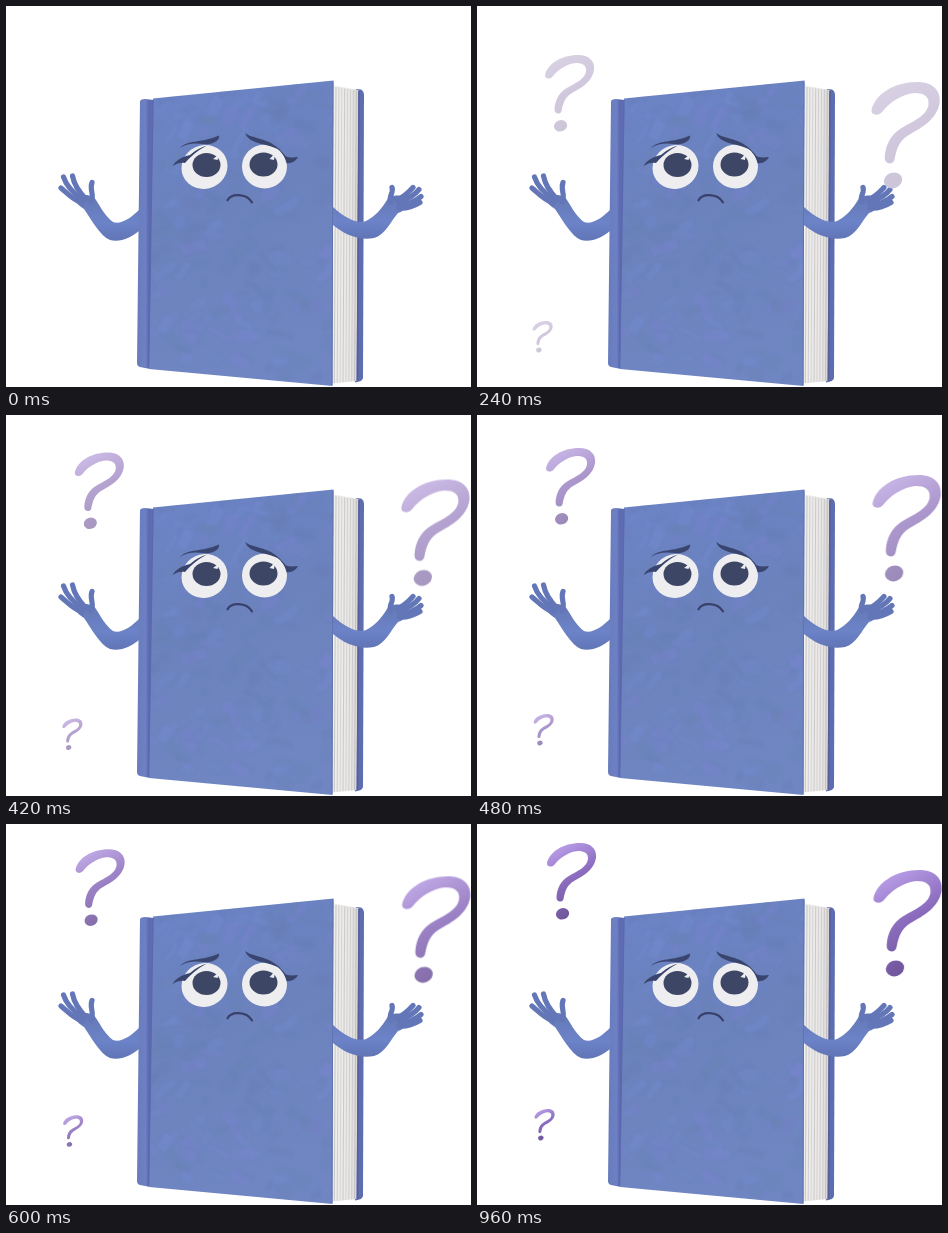
Recreate the animation shown at these times as an HTML page. Size 465x381 px, loop 1.09 s.

```html
<!DOCTYPE html>
<html lang="en">
<head>
<meta charset="utf-8">
<title>Puzzled book</title>
<style>
  html, body { margin: 0; width: 100%; height: 100%; overflow: hidden; background: #fff; }
  svg { display: block; width: 100vw; height: 100vh; }
</style>
</head>
<body>
<svg viewBox="0 0 465 381" xmlns="http://www.w3.org/2000/svg">
  <defs>
    <linearGradient id="cover" x1="0" y1="0" x2=".25" y2="1">
      <stop offset="0" stop-color="#6c83c6"/>
      <stop offset=".5" stop-color="#6b82bd"/>
      <stop offset="1" stop-color="#6f86c2"/>
    </linearGradient>
    <linearGradient id="spine">
      <stop offset="0" stop-color="#687cbc"/>
      <stop offset=".5" stop-color="#6d80c4"/>
      <stop offset=".7" stop-color="#5c69b0"/>
      <stop offset="1" stop-color="#6271b6"/>
    </linearGradient>
    <linearGradient id="paper">
      <stop offset="0" stop-color="#f0efee"/>
      <stop offset=".7" stop-color="#e9e7e6"/>
      <stop offset="1" stop-color="#d6d3d4"/>
    </linearGradient>
    <linearGradient id="arm" x1="0" y1="0" x2="0" y2="1">
      <stop offset="0" stop-color="#6478b4"/>
      <stop offset=".6" stop-color="#6c83c8"/>
      <stop offset="1" stop-color="#6175b6"/>
    </linearGradient>
    <linearGradient id="ink" gradientUnits="userSpaceOnUse" x1="4" y1="8" x2="36" y2="66">
      <stop offset="0"/><stop offset=".5"/><stop offset="1"/>
    </linearGradient>
    <filter id="soft"><feGaussianBlur stdDeviation=".9"/></filter>
    <clipPath id="front"><path d="M147 92.5L327.5 74.5L326.5 380L143 363Z"/></clipPath>
    <g id="mark">
      <path d="M0 20C2.500 9 16 0 33 0C44 0 50 6 49 15C47 27 36 33 27 38C20 42 18 48 16.500 56C15.500 60 9 59.500 9.500 54C10 45 14 38 21 33.500C30 28 40 24.500 41 16C41.500 10 37 8 31 8C21 9 13 15 8 21C5 25 -.5 24 0 20Z"/>
      <ellipse cx="15.500" cy="70.800" rx="6.700" ry="5.600" transform="rotate(-20 15.5 70.8)"/>
    </g>
  </defs>

  <!-- back cover and pages -->
  <path d="M350 83L355 83.500Q358 85 358 89L357 372Q356.500 375.500 349 376.500Z" fill="#5d6db2"/>
  <path d="M328 79.500L352.500 84L350.500 375L326.500 377.500Z" fill="url(#paper)"/>
  <g id="sheets" fill="none" stroke="#c0bebf"/>
  <path d="M353 85L351.500 375" stroke="#595f95" stroke-width="1.600"/>

  <!-- front -->
  <path d="M134 95Q135 93 139 93L148 94L144 363L134 361Q131 360 131 357Z" fill="url(#spine)"/>
  <path d="M147 92.500L327.500 74.500L326.500 380L143 363Z" fill="url(#cover)"/>
  <g clip-path="url(#front)"><g id="strokes" filter="url(#soft)" fill="none" stroke-linecap="butt"/></g>
  <path d="M147 94L142.500 362" stroke="#5b68ad" stroke-width="1.400"/>
  <path d="M327 75.500L326 379" stroke="#6173b0" stroke-width="1"/>

  <!-- arms -->
  <g fill="url(#arm)">
    <path d="M134 203C125 212 115 219 107 216C100 211 95 202 90 194C86 187 71 188 70 193C70 198 75 201 78 203C85 213 94 230 104 234C114 237 126 231 133 225Z"/>
    <path d="M327 201C340 213 352 218 360 215C370 210 376 202 381 194C385 187 402 189 403 195C402 202 396 206 392 207C385 215 379 229 368 232C352 235 338 228 327 219Z"/>
  </g>
  <g fill="none" stroke="#6376b7" stroke-linecap="round" stroke-width="5.200">
    <path d="M76 197C67 194 61 187 55 182"/>
    <path d="M77 194C67 187 60 179 57.500 171"/>
    <path d="M80 193C73 186 68 178 66.500 170"/>
    <path d="M85 196C89 189 83 184 86 176.500"/>
    <path d="M385 196C382 190 388 187 386 181.500"/>
    <path d="M391 194C398 191 402 187 407 181.500"/>
    <path d="M393 196C402 193 409 189 413 183.500"/>
    <path d="M394 199C404 198 410 195 415 190.500"/>
    <path d="M393 202C402 203 408 200 414 196.500"/>
  </g>

  <!-- face -->
  <g fill="#eeeef0">
    <ellipse cx="198.500" cy="161" rx="23.300" ry="21.700" transform="rotate(-25 198.500 161)"/>
    <ellipse cx="258.500" cy="160.500" rx="22.500" ry="22"/>
  </g>
  <g fill="#3d4664">
    <ellipse cx="200.500" cy="159" rx="14" ry="12"/>
    <ellipse cx="257.500" cy="158.500" rx="14" ry="12"/>
  </g>
  <path d="M207 153L213.500 148L211.500 154ZM263.500 153L269 147.500L268 154Z" fill="#eeeef0"/>
  <g fill="#39456e">
    <path d="M166.500 160C170 154 176 151 184 149C190 144 195 141 201 139.500C194 143 187 148 179 157C175 156 171 157 166.500 160Z"/>
    <path d="M268 140C274 143 277 147 280 150.500C284 152 288 151.500 292 151C290 155 285 158 280.500 157C279 150 274 144 268 140Z"/>
    <path d="M174 142C182 133 196 137.500 213 129.500C214 134.500 207 139 198 138C188 137 182 137 174 142Z"/>
    <path d="M239 126.500C244 133 263 131 275 145C262 136.500 243 139.500 239 126.500Z"/>
  </g>
  <path d="M221.500 194.300C225 187.300 240 187 246 196.300" fill="none" stroke="#39406a" stroke-width="2.200" stroke-linecap="round"/>

  <g id="marks" fill="url(#ink)"></g>
</svg>
<script>
const NS = "http://www.w3.org/2000/svg";
const $ = id => document.getElementById(id);

function add(parent, tag, attrs) {
  const node = document.createElementNS(NS, tag);
  for (const key in attrs) node.setAttribute(key, attrs[key]);
  return parent.appendChild(node);
}

let seed = 29;
function rand(min, max) {
  seed = (seed * 16807) % 2147483647;
  return min + (max - min) * seed / 2147483647;
}

// Painted cover texture: short, broad, translucent brush strokes.
const paints = ["#7b82cf", "#6880b0", "#748cd0", "#667cb4"];
for (let i = 0; i < 170; i++) {
  const x = rand(140, 328), y = rand(80, 376);
  const angle = rand(-1.3, 0.9), len = rand(8, 28);
  const dx = Math.cos(angle) * len, dy = Math.sin(angle) * len;
  add($("strokes"), "path", {
    d: `M${x} ${y}q${dx / 2 + rand(-5, 5)} ${dy / 2 + rand(-5, 5)} ${dx} ${dy}`,
    stroke: paints[i % 4], "stroke-width": rand(4, 13), opacity: rand(0.18, 0.42)
  });
}

for (let i = 0; i < 8; i++) {
  const x = 330 + i * 2.9;
  add($("sheets"), "path", {
    d: `M${x} ${81 + i * 0.5}L${x - 1.7} ${377 - i * 0.25}`,
    "stroke-width": rand(0.6, 1.1), opacity: rand(0.6, 1)
  });
}

const marks = [
  { x: 70, y: 19, size: 1, start: 60 },
  { x: 396.5, y: 46, size: 1.39, start: 60 },
  { x: 57.5, y: 285, size: 0.41, start: 240 }
];
for (const m of marks) m.node = add($("marks"), "use", { href: "#mark" });

const LOOP = 1090, STEP = 60, LAST = 960;
const WHITE = [255, 255, 255], PALE = [222, 217, 227];
const INKS = [[184, 156, 230], [139, 108, 190], [112, 86, 156]];
const drops = [[0, 47], [180, 35], [300, 25], [420, 18.5], [540, 9.5], [720, 0], [LAST, 0]];
const stops = document.querySelectorAll("#ink stop");

const mix = (a, b, k) => a.map((v, i) => Math.round(v + (b[i] - v) * k));

function dropAt(t) {
  const i = Math.max(1, drops.findIndex(d => d[0] >= t));
  const [t0, a] = drops[i - 1], [t1, b] = drops[i];
  return a + (b - a) * (t - t0) / (t1 - t0);
}

function draw(time) {
  const t = Math.min(LAST, Math.floor((time % LOOP) / STEP) * STEP);
  const drop = dropAt(t);
  const depth = Math.min(1, Math.max(0, (t - 180) / 540)) ** 0.85;
  stops.forEach((stop, i) => {
    const rgb = t < 180 ? mix(WHITE, PALE, t / 180) : mix(PALE, INKS[i], depth);
    stop.setAttribute("stop-color", `rgb(${rgb})`);
  });
  for (const m of marks) {
    m.node.setAttribute("visibility", t >= m.start ? "visible" : "hidden");
    m.node.setAttribute("transform",
      `translate(${m.x - drop * 0.065} ${m.y + drop}) scale(${m.size})`);
  }
}

const begin = performance.now();
function tick() {
  draw(performance.now() - begin);
  requestAnimationFrame(tick);
}
draw(0);
requestAnimationFrame(tick);
</script>
</body>
</html>
```
